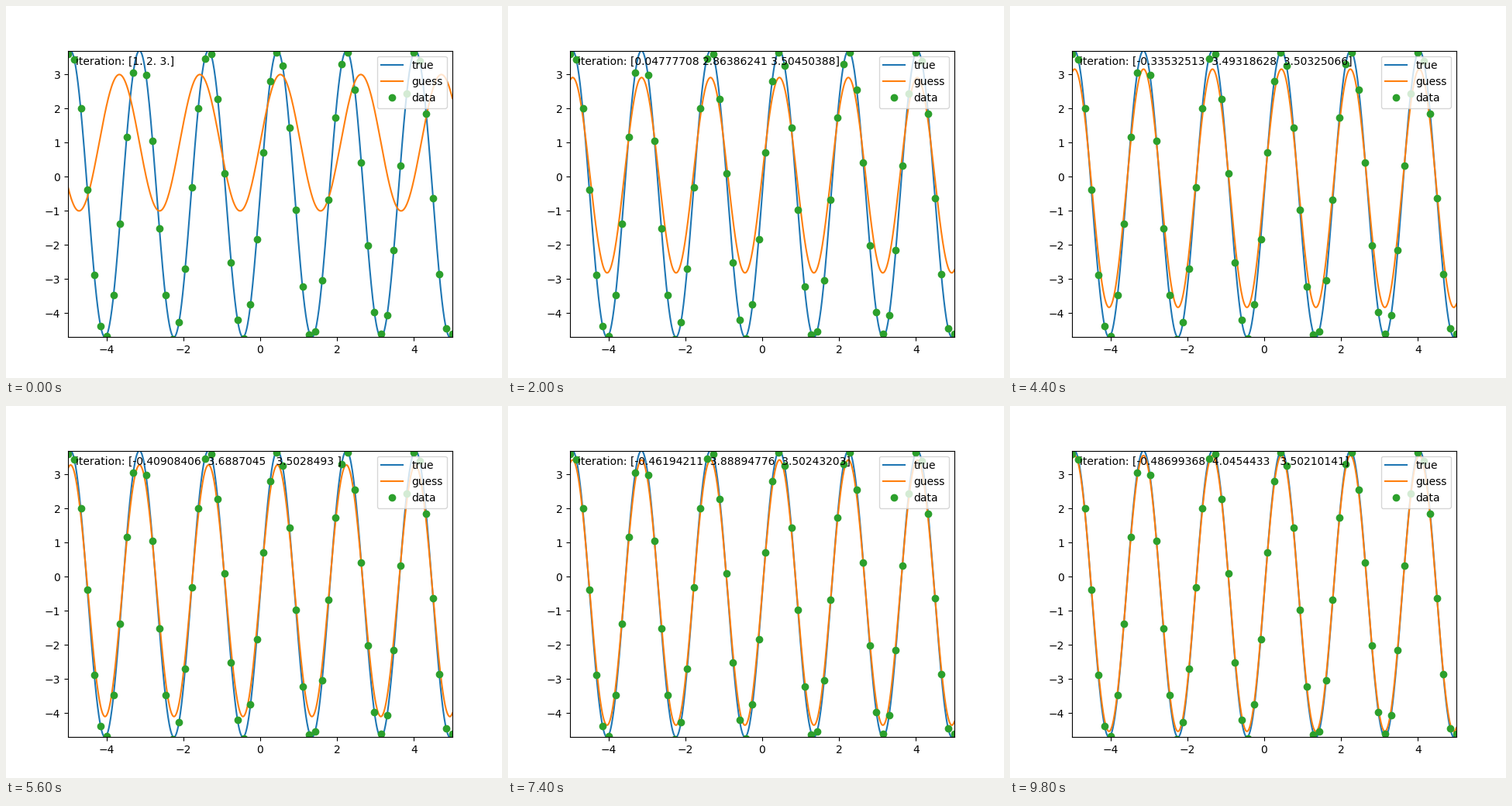
Animation, 640 px wide and 480 px high, one loop 10 s. Source, as a matplotlib script:

```python
import numpy as np
import matplotlib.pyplot as plt
from matplotlib.animation import FuncAnimation

FRAMES, INTERVAL = 50, 200
STEPS, RATE = 5, 0.01          # gradient steps per frame, learning rate
POINTS, NOISE = 60, 0.05

# offset, amplitude and frequency of a sine wave
TRUE = np.array([-0.5, 4.2, 3.5])
START = np.array([1.0, 2.0, 3.0])
BEST = np.array([-0.4976054, 4.22829, 3.50171])    # least-squares fit


def wave(p, x):
    return p[0] + p[1] * np.sin(p[2] * x)


def jacobian(p, x):
    return np.column_stack([np.ones_like(x), np.sin(p[2] * x),
                            p[1] * x * np.cos(p[2] * x)])


def make_data():
    """Noisy samples whose least-squares fit is BEST."""
    x = np.linspace(-5, 5, POINTS)
    noise = np.random.default_rng(4).normal(0, NOISE, POINTS)
    jac = jacobian(BEST, x)
    noise -= jac @ np.linalg.lstsq(jac, noise, rcond=None)[0]
    return x, wave(BEST, x) + noise


def descend(p, x, y):
    """One frame of gradient descent on the mean squared error."""
    for _ in range(STEPS):
        error = wave(p, x) - y
        p = p - RATE * 2 * jacobian(p, x).T @ error / len(x)
    return p


xd, yd = make_data()
path = [START]
while len(path) < FRAMES:
    path.append(descend(path[-1], xd, yd))

xs = np.linspace(-5, 5, 1000)
fig, ax = plt.subplots(figsize=(6.4, 4.8), dpi=100)
ax.plot(xs, wave(TRUE, xs), label="true")
guess, = ax.plot(xs, wave(START, xs), label="guess")
ax.plot(xd, yd, "o", label="data")
ax.set_xlim(-5, 5)
ax.set_ylim(TRUE[0] - TRUE[1], TRUE[0] + TRUE[1])
ax.legend(loc="upper right")
note = ax.text(0.02, 0.95, "", transform=ax.transAxes)


def update(n):
    guess.set_ydata(wave(path[n], xs))
    note.set_text(f"iteration: {path[n]}")
    return guess, note


anim = FuncAnimation(fig, update, frames=FRAMES, interval=INTERVAL,
                     repeat=True, repeat_delay=0)
plt.show()
```
